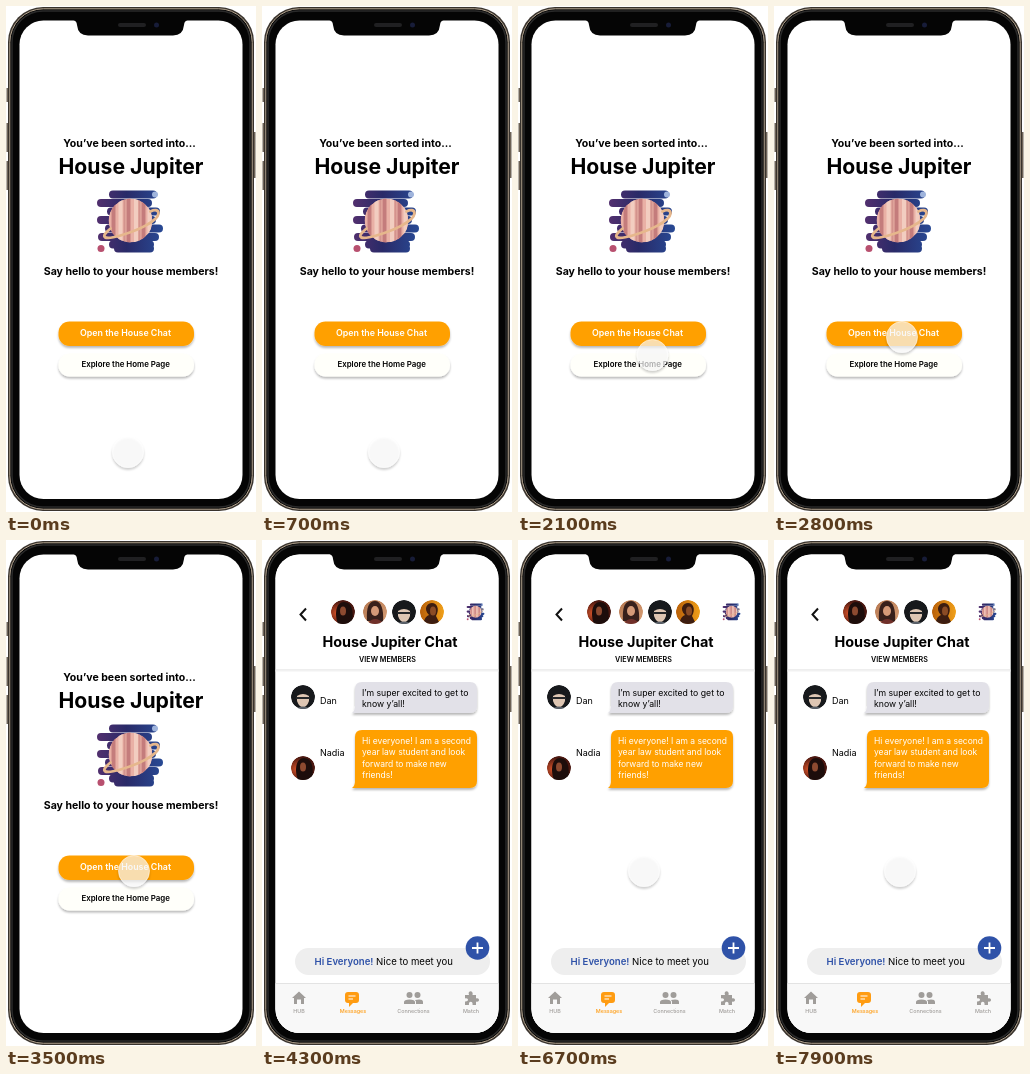
Animation of 250 by 506 pixels, one loop 8000 ms. Source, as an HTML page:

```html
<!DOCTYPE html>
<html lang="en">
<head>
<meta charset="utf-8">
<title>House chat</title>
<style>
  html, body { margin: 0; width: 100%; height: 100%; overflow: hidden; background: #fff; }
  svg { display: block; width: 100vw; height: 100vh; }
  text { font-family: Inter, Roboto, sans-serif; font-size: 8.5px; }
  .b { font-weight: 600; }
  .mid { text-anchor: middle; }
  .title { font-size: 21.2px; font-weight: 700; }
  .head { font-size: 10.55px; font-weight: 700; }
  .tab { font-size: 5.4px; font-weight: 500; text-anchor: middle; }
</style>
</head>
<body>
<svg viewBox="0 0 250 506">
  <defs>
    <linearGradient id="sky" gradientUnits="userSpaceOnUse" x1="-34" y1="0" x2="38" y2="0">
      <stop offset="0" stop-color="#56306f"/><stop offset=".45" stop-color="#292a68"/><stop offset="1" stop-color="#284c98"/>
    </linearGradient>
    <radialGradient id="warm" cx=".25" cy=".55">
      <stop offset="0" stop-color="#d8542a"/><stop offset="1" stop-color="#4a1710"/>
    </radialGradient>
    <linearGradient id="dusk" x2="1" y2="1">
      <stop offset="0" stop-color="#b4764f"/><stop offset="1" stop-color="#d9a077"/>
    </linearGradient>
    <linearGradient id="amber" x2="1">
      <stop offset="0" stop-color="#b96009"/><stop offset="1" stop-color="#f0a01a"/>
    </linearGradient>
    <filter id="drop" x="-30%" y="-30%" width="160%" height="180%">
      <feDropShadow dx="0" dy="2" stdDeviation="1.3" flood-opacity=".28"/>
    </filter>
    <clipPath id="screen"><rect x="13.5" y="14.5" width="223" height="478.5" rx="24"/></clipPath>
    <clipPath id="globe"><circle r="22"/></clipPath>
    <clipPath id="disc"><circle r="12"/></clipPath>

    <g id="planet">
      <path d="M-15-29H25M-27-20.500H20M-17-12H28M-27-3.500H24M-19 5H31M-26 13.500H27M-15 21H22M-10 25H22"
        stroke="url(#sky)" stroke-width="8" stroke-linecap="round"/>
      <circle cx="27" cy="-29" r="3" fill="#9fb4dc"/>
      <circle cx="-27" cy="25" r="3.500" fill="#b8506f"/>
      <g transform="translate(2.500 -3)">
        <g clip-path="url(#globe)">
          <circle r="22" fill="#e9b0a5"/>
          <path d="M-17-24V24M-2-24V24M13-24V24" stroke="#c47c7c" stroke-width="4"/>
          <path d="M-10-24V24M5.500-24V24M19-24V24" stroke="#f2cdc0" stroke-width="4"/>
          <path d="M-6-24V24M9-24V24" stroke="#d3938d" stroke-width="2"/>
        </g>
        <path d="M-20 8C-31 17-27 20-10 15S27 1 28-7C28-11 24-11 20-9" fill="none" stroke="#e6b78c" stroke-width="2.800" stroke-linecap="round"/>
      </g>
    </g>

    <g id="ava1" clip-path="url(#disc)">
      <circle r="12" fill="url(#warm)"/>
      <path d="M-5 12C-9 2-7-10 1-10S11-1 9 12Z" fill="#1d0d0b"/>
      <ellipse cx="0" cy="-1" rx="3" ry="4.500" fill="#8d4a30"/>
    </g>
    <g id="ava2" clip-path="url(#disc)">
      <circle r="12" fill="url(#dusk)"/>
      <path d="M-8 9C-9-5-6-11 0-11S9-3 8 10Z" fill="#38201b"/>
      <ellipse cy="-1" rx="4" ry="5" fill="#d59a78"/>
      <path d="M-8 12Q0 2 9 12Z" fill="#70302a"/>
    </g>
    <g id="ava3" clip-path="url(#disc)">
      <circle r="12" fill="#17191c"/>
      <path d="M-6-1Q0-5 6-1V4Q4 10 0 10T-6 4Z" fill="#dec6b3"/>
      <path d="M-7 1H7" stroke="#25272a" stroke-width="2"/>
      <path d="M-8 12Q0 7 8 12Z" fill="#596069"/>
    </g>
    <g id="ava4" clip-path="url(#disc)">
      <circle r="12" fill="url(#amber)"/>
      <path d="M-9 12Q-7 4-3 3C-9-3-5-9 0-9S8-3 4 4L8 12Z" fill="#3d1d10"/>
      <ellipse cx="1" cy="-1" rx="3" ry="4.500" fill="#8b4c25"/>
    </g>
  </defs>

  <rect width="250" height="506" fill="#fff"/>
  <path d="M1.500 82V96M1.500 117V146M1.500 155V184M248.500 126V172" stroke="#6d6255" stroke-width="2"/>
  <rect x="2" y="1" width="246" height="504" rx="35" fill="#39332d"/>
  <rect x="3.800" y="2.800" width="242.400" height="500.400" rx="33.500" fill="#050505" stroke="#b8a893"/>
  <rect x="6" y="5" width="238" height="496" rx="31" fill="none" stroke="#2a2a2a" stroke-width="1.500"/>

  <g clip-path="url(#screen)">
    <rect width="250" height="506" fill="#fff"/>

    <g id="welcome">
      <g class="mid">
        <text class="head" x="123.500" y="141">You’ve been sorted into...</text>
        <text class="title" x="125" y="168">House Jupiter</text>
        <text class="head" x="125" y="269">Say hello to your house members!</text>
      </g>
      <use href="#planet" transform="translate(122 217.500)"/>
      <g filter="url(#drop)">
        <rect x="52.500" y="315.500" width="135.500" height="24.500" rx="11" fill="#ffa000"/>
        <rect x="52.500" y="347.500" width="135.500" height="23" rx="11" fill="#fffffa"/>
      </g>
      <g class="mid b">
        <text x="119.500" y="330" fill="#fff" style="font-size:8.850px">Open the House Chat</text>
        <text x="119.700" y="361" style="font-size:7.900px">Explore the Home Page</text>
      </g>
    </g>

    <g id="chat">
      <rect width="250" height="506" fill="#fff"/>
      <path d="M44 68.500L38.500 74.500L44 80.500" fill="none" stroke="#111" stroke-width="2"/>
      <use href="#ava1" x="81" y="72"/>
      <use href="#ava2" x="113" y="72"/>
      <use href="#ava3" x="142" y="72"/>
      <use href="#ava4" x="170" y="72"/>
      <use href="#planet" transform="translate(213 72.500) scale(.27)"/>
      <g class="mid b">
        <text x="128" y="107" style="font-size:14.400px;font-weight:700">House Jupiter Chat</text>
        <text x="125.500" y="122" style="font-size:7.200px">VIEW MEMBERS</text>
      </g>
      <path d="M8 130H242" stroke="#ddd"/>
      <path d="M8 131H242" stroke="#f2f2f2"/>

      <use href="#ava3" x="41" y="157"/>
      <use href="#ava1" x="41" y="228"/>
      <text x="58" y="164" style="font-size:9px">Dan</text>
      <text x="58" y="216" style="font-size:9px">Nadia</text>
      <g filter="url(#drop)">
        <path d="M100 142H208Q215 142 215 149V166Q215 173 208 173H90Q93 171 93 166V149Q93 142 100 142Z" fill="#e2e1e8"/>
        <path d="M100 190H208Q215 190 215 197V241Q215 248 208 248H90Q93 246 93 241V197Q93 190 100 190Z" fill="#ffa000"/>
      </g>
      <text style="font-size:8.700px"><tspan x="100" y="156">I’m super excited to get to</tspan><tspan x="100" y="167">know y’all!</tspan></text>
      <text fill="#fff"><tspan x="100" y="203.500">Hi everyone! I am a second</tspan><tspan x="100" y="215">year law student and look</tspan><tspan x="100" y="226.500">forward to make new</tspan><tspan x="100" y="238">friends!</tspan></text>

      <rect x="33" y="408" width="195" height="27" rx="13.500" fill="#eee"/>
      <text x="52.500" y="425" style="font-size:9.600px"><tspan class="b" fill="#2f52a8">Hi Everyone!</tspan> Nice to meet you</text>
      <circle cx="215.500" cy="408" r="11.800" fill="#2f52a8"/>
      <path d="M210 408H221M215.500 402.500V413.500" stroke="#fff" stroke-width="1.800"/>

      <rect x="8" y="443.500" width="234" height="60" fill="#f8f8f8"/>
      <path d="M8 443.500H242" stroke="#ddd" stroke-width=".8"/>
      <g fill="#a09d9a">
        <path d="M30 458L37 451.500L44 458H42V464H39V459.500H35V464H32V458Z"/>
        <circle cx="147.500" cy="455" r="3"/><circle cx="155.500" cy="455" r="3"/>
        <path d="M142 464V462Q142 459.500 147.500 459.500T153 462V464ZM154 464V461.500L153 460Q161 458.500 161 462V464Z"/>
        <path d="M203 455H207C205 450 212 450 210.500 455H214V458.500C218 457 218 463 214 461.500V465H210.500C211.500 460.500 206 460.500 207 465H203V461.500C207 462 207 457.500 203 458.500Z"/>
        <text class="tab" x="37" y="472.500">HUB</text>
        <text class="tab" x="151.500" y="472.500">Connections</text>
        <text class="tab" x="209" y="472.500">Match</text>
      </g>
      <g fill="#ff9c12">
        <path d="M86 452H94Q97 452 97 455V460Q97 463 94 463H91L87 467V463H86Q83 463 83 460V455Q83 452 86 452Z"/>
        <path d="M86.500 456H93.500M86.500 459H91" stroke="#fff" stroke-width="1.200"/>
        <text class="tab" x="91" y="472.500">Messages</text>
      </g>
    </g>

    <g id="finger">
      <circle r="15.500" fill="#fff" fill-opacity=".65" stroke="#fff" stroke-opacity=".5" filter="url(#drop)"/>
    </g>
  </g>
  <path d="M64 13Q71 14 71 19Q72 29.500 82 29.500H167Q177 29.500 178 19Q178 14 185 13Z" fill="#050505"/>
  <rect x="112" y="17" width="28" height="4" rx="2" fill="#202022"/>
  <circle cx="150.500" cy="19" r="2.500" fill="#171c38"/>
</svg>
<script>
  const LOOP = 8000;
  // time, x, y
  const path = [[0, 122, 446], [850, 122, 446], [1300, 127, 415], [1800, 133, 368],
                [2100, 134.5, 349], [2700, 128, 331], [3900, 128, 331], [4100, 126, 331]];
  const chat = document.getElementById('chat');
  const finger = document.getElementById('finger');
  const ramp = (t, from, to) => Math.min(1, Math.max(0, (t - from) / (to - from)));

  function fingerAt(t) {
    const i = path.findIndex(p => p[0] > t);
    if (i < 0) return path[path.length - 1].slice(1);
    const [t0, x0, y0] = path[i - 1], [t1, x1, y1] = path[i];
    let k = ramp(t, t0, t1);
    if (t1 === 2700) k = 1 - (1 - k) ** 2; // settle on the button
    return [x0 + (x1 - x0) * k, y0 + (y1 - y0) * k];
  }

  function draw(now) {
    const t = now % LOOP;
    chat.setAttribute('opacity', ramp(t, 3850, 4050));
    finger.setAttribute('transform', `translate(${fingerAt(t)})`);
    finger.setAttribute('opacity', t < 4500 ? 1 - ramp(t, 3850, 4050) : ramp(t, 4900, 5100));
    requestAnimationFrame(draw);
  }
  requestAnimationFrame(draw);
</script>
</body>
</html>
```
